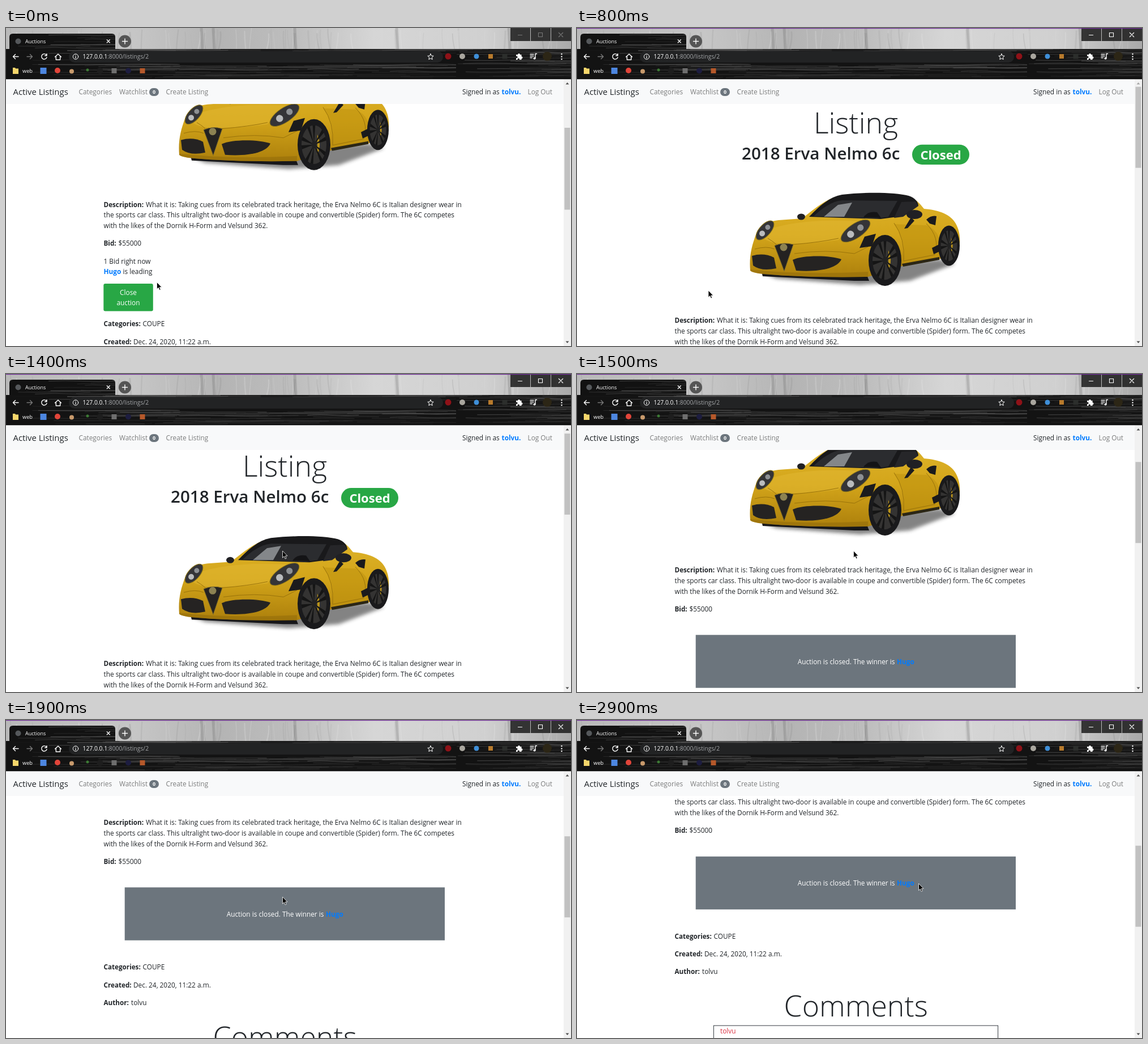
These frames come from a looping animation (998x561 px, 3000 ms). An HTML page:

```html
<!DOCTYPE html>
<html lang="en">
<head>
<meta charset="utf-8">
<title>Auctions</title>
<style>
  html, body { margin: 0; width: 100%; height: 100%; overflow: hidden; background: #fff; }
  svg { display: block; width: 100vw; height: 100vh; }
  text { font: 11.84px "Open Sans", "Noto Sans", sans-serif; fill: #212529; white-space: pre; }
  .b { font-weight: 700; font-size: 11.7px; }
  .link { fill: #007bff; font-weight: 700; }
  .nav { fill: #7c7d7d; }
  .white { fill: #fff; }
  .mid { text-anchor: middle; }
  .display { font-size: 51.8px; font-weight: 300; text-anchor: middle; }
  .line { fill: none; stroke: #fff; stroke-width: 1.4; stroke-linecap: round; stroke-linejoin: round; }
</style>
</head>
<body>
<svg viewBox="0 0 998 561" preserveAspectRatio="none">
  <defs>
    <linearGradient id="paint" x1="0" y1="0" x2="0" y2="1">
      <stop offset="0" stop-color="#dfb42a"/>
      <stop offset=".5" stop-color="#d3a51a"/>
      <stop offset="1" stop-color="#ad800c"/>
    </linearGradient>
    <linearGradient id="fogL" x1="0" y1="0" x2="1" y2="0">
      <stop offset="0" stop-color="#b9b9b9"/>
      <stop offset=".45" stop-color="#c6c6c6"/>
      <stop offset=".75" stop-color="#b4b4b4"/>
      <stop offset="1" stop-color="#bdbdbd"/>
    </linearGradient>
    <linearGradient id="fogR" x1="0" y1="0" x2="1" y2="0">
      <stop offset="0" stop-color="#bcbcbc"/>
      <stop offset=".3" stop-color="#d6d6d6"/>
      <stop offset=".7" stop-color="#d0d0d0"/>
      <stop offset="1" stop-color="#a9a9a9"/>
    </linearGradient>
    <filter id="soft" x="-10%" y="-50%" width="120%" height="200%"><feGaussianBlur stdDeviation="3"/></filter>
    <clipPath id="tabClip"><path d="M6 37V16Q6 10 12 10H187Q193 10 193 16V37Z"/></clipPath>
    <clipPath id="barClip"><rect y="37" width="998" height="53"/></clipPath>
    <clipPath id="bodyClip"><use href="#body"/></clipPath>
  </defs>

  <rect width="998" height="561" fill="#fff"/>

  <g id="page">
    <g id="heading">
      <text class="display" x="492.5" y="186">Listing</text>
      <text x="291" y="232" style="font-size:29.6px;font-weight:600">2018 Erva Nelmo 6c</text>
      <g class="done">
        <rect x="592" y="205.7" width="101" height="35.2" rx="17.6" fill="#28a745"/>
        <text class="mid white" x="642.5" y="232" style="font-size:22px;font-weight:700">Closed</text>
      </g>
    </g>

    <g id="car">
      <path d="M332 434L640 408 668 416 588 446 500 453 352 442Z" fill="#333" opacity=".6" filter="url(#soft)"/>
      <path d="M326 430L512 436 516 446 490 446 328 438Z" fill="#17171a"/>
      <path id="body" d="M306 428C304 404 308 385 317 362 322 348 338 341 356 339L398 336C420 318 440 302 462 296 500 290 560 290 584 296 598 301 606 310 613 319 640 321 660 329 669 345 677 359 678 378 674 390L640 408 574 420 514 439Q410 441 330 434 310 432 306 428Z" fill="url(#paint)"/>
      <g clip-path="url(#bodyClip)">
        <path d="M318 363Q390 331 520 343 480 347 462 374 400 382 366 380 340 382 318 363Z" fill="#e3ba34" opacity=".5"/>
        <path d="M560 346Q584 376 577 421L642 404Q648 360 617 348Z" fill="#c2940f" opacity=".6"/>
        <path d="M306 426Q400 436 514 430V442H306Z" fill="#8f6a0a" opacity=".5"/>
      </g>
      <path d="M410 333C428 314 446 298 468 294 510 289 562 290 586 296 597 300 602 306 603 313L574 332 536 337Z" fill="#19191b"/>
      <path d="M418 332C434 317 450 306 468 304L566 305 550 333 530 336Z" fill="#2b2c2f"/>
      <path d="M436 333L461 312 486 308 472 333Z" fill="#84878a"/>
      <path d="M506 334Q514 322 530 325L537 335Z" fill="#141416"/>
      <path d="M573 307L598 306 603 314 576 333 560 335Z" fill="#262629"/>
      <path d="M617 338Q626 330 635 332L633 348 623 345Z" fill="#1a1a1c"/>
      <path d="M578 354L590 334 596 340 584 353Z" fill="#1c1c1f"/>
      <ellipse cx="596" cy="329" rx="14" ry="8" fill="#202024"/>
      <ellipse cx="396" cy="333" rx="7" ry="5.5" fill="#202024"/>
      <g fill="none" stroke="#9a730a">
        <path d="M337 371Q352 380 353 384M381 382Q430 378 462 371"/>
        <path d="M560 344Q580 372 577 411L632 400Q642 370 617 345"/>
        <path d="M314 390Q335 384 349 390M384 398Q440 390 490 398L514 386"/>
      </g>
      <g id="lamps"></g>
      <path d="M309 402Q330 396 348 405L352 424Q326 430 311 419Z" fill="#252322"/>
      <path d="M381 409C400 400 448 401 467 408 460 424 428 431 387 428Z" fill="#252322"/>
      <path d="M349 384Q365 377 382 382L366 429Z" fill="#242221" stroke="#7d6b2c"/>
      <circle cx="365" cy="387" r="6.5" fill="#8c8252"/>
      <path d="M508 368L528 363 521 385 499 388Z" fill="#1b1b1d"/>
      <path d="M516 399L521 390 519 410Z" fill="#d23420"/>
      <path d="M627 388L641 381 641 394 630 399Z" fill="#1a1a1c"/>
      <path d="M574 416L640 404 640 409 576 421Z" fill="#2b2615"/>
      <g id="wheels"></g>
    </g>

    <g id="copy"></g>

    <g class="open">
      <text x="172.5" y="620">1 Bid right now</text>
      <text class="link" x="172.5" y="638.7">Hugo</text>
      <text x="206.5" y="638.7">is leading</text>
      <rect id="button" x="172.3" y="655.3" width="87.5" height="48.5" rx="3"/>
      <text class="mid white" x="216" y="675">Close</text>
      <text class="mid white" x="216" y="693.7">auction</text>
    </g>

    <g class="done">
      <rect x="209.7" y="630.3" width="565.3" height="93.4" fill="#6c757d"/>
      <text class="white" x="389.7" y="681.7">Auction is closed. The winner is</text>
      <text class="link" x="565" y="681.7">Hugo</text>
    </g>

    <g id="meta"></g>

    <g class="done">
      <text class="display" x="492.7" y="912.5">Comments</text>
      <rect x="241.4" y="928.6" width="502.2" height="80" fill="none" stroke="#343a40"/>
      <text x="253" y="942.6" style="fill:#dc3545">tolvu</text>
    </g>
  </g>

  <g id="navbar">
    <rect y="90" width="985" height="44" fill="#f8f9fa"/>
    <text x="12.5" y="118.3" style="font-size:14.9px">Active Listings</text>
    <text class="nav" x="128.5" y="117">Categories</text>
    <text class="nav" x="200" y="117">Watchlist</text>
    <rect x="253" y="106" width="17" height="14" rx="7" fill="#6c757d"/>
    <text class="mid white" x="261.5" y="116.4" style="font-size:9px;font-weight:700">0</text>
    <text class="nav" x="282.5" y="117">Create Listing</text>
    <text x="806" y="117">Signed in as</text>
    <text class="link" x="875.5" y="117">tolvu.</text>
    <text class="nav" x="921.5" y="117">Log Out</text>
  </g>

  <g id="scrollbar">
    <rect x="985" y="90" width="13" height="471" fill="#f1f1f1"/>
    <rect id="thumb" x="986.5" width="10" fill="#c1c1c1"/>
    <path id="up" d="M988.5 99.5L991.5 96 994.5 99.5Z"/>
    <path d="M988.5 552.5L991.5 556 994.5 552.5Z" fill="#505050"/>
  </g>

  <g id="browser">
    <rect width="502" height="37" fill="url(#fogL)"/>
    <rect x="502" width="496" height="37" fill="url(#fogR)"/>
    <g id="trees"></g>
    <rect y="37" width="998" height="53" fill="#131313"/>
    <path d="M6 37V16Q6 10 12 10H187Q193 10 193 16V37Z" fill="#121212"/>
    <g id="tabGrain" clip-path="url(#tabClip)"></g>
    <g id="barGrain" clip-path="url(#barClip)"></g>
    <rect y="89" width="998" height="1.3" fill="#050505"/>

    <circle cx="21.5" cy="23.5" r="5" fill="#55585b"/>
    <text class="white" x="34" y="26.8" style="font-size:9px">Auctions</text>
    <path class="line" d="M178.3 20.7l5 5m0-5l-5 5"/>
    <circle cx="210" cy="23.5" r="11" fill="#555"/>
    <path class="line" d="M205.5 23.5h9m-4.5-4.5v9"/>

    <path class="line" d="M22 50.5H12.5m4-4l-4 4 4 4"/>
    <path class="line" d="M37 50.5h9.5m-4-4l4 4-4 4" style="stroke:#777"/>
    <path class="line" d="M71 47.2a4.7 4.7 0 1 0 1 4.5M72 45.5v3.3h-3.3"/>
    <path class="line" d="M86.5 51l5.5-5 5.5 5M88.3 50v6h7.4v-6"/>
    <rect x="111" y="40.5" width="661" height="20.5" rx="10.2" fill="#222324"/>
    <circle class="line" cx="123" cy="50.5" r="4.7" style="stroke-width:1"/>
    <path class="line" d="M123 50v3m0-5.2v.1" style="stroke-width:1.2"/>
    <text class="white" x="135.5" y="54.3" style="font-size:10.3px">127.0.0.1<tspan fill="#a4a6a8">:8000/listings/2</tspan></text>
    <path class="line" d="M750 45.5l1.5 3.4 3.7.4-2.8 2.5.8 3.7-3.2-1.9-3.2 1.9.8-3.7-2.8-2.5 3.7-.4Z" style="stroke-width:1"/>
    <g id="icons"></g>
    <path d="M901 47h3a2 2 0 1 1 4 0h2.5v3.2a2 2 0 1 1 0 4V56h-3.5a1.8 1.8 0 1 0-3.4 0H901v-3a1.8 1.8 0 1 0 0-3.2Z" fill="#fff"/>
    <path class="line" d="M926 46.5h6m-6 3h6m-6 3h3.5m5.5 1v-8h2.5"/>
    <circle cx="933.5" cy="53.5" r="2" fill="#fff"/>
    <path d="M981.5 46v.1m0 4.4v.1m0 4.4v.1" stroke="#fff" stroke-width="2.4" stroke-linecap="round"/>
    <path d="M12 70h4l1 1.5h5V81H12Z" fill="#f6d66b"/>
    <text class="white" x="29" y="78.7" style="font-size:9.2px">web</text>

    <path d="M891 0h35v23h-35ZM927 0h35v23h-35ZM963 0h35v23h-35Z" fill="#202020" opacity=".88"/>
    <path id="controls" d="M904 12.5h8M940.5 8.5h7v7h-7ZM976 8l8 8m0-8l-8 8" fill="none" stroke-width="1.1"/>
    <rect id="focusLine" width="998" height="1.2" fill="#6d2c94"/>
  </g>

  <path id="arrow" d="M0 0V12.2L2.8 9.6 4.7 14 6.7 13.1 4.8 8.9H8.6Z" fill="#000" stroke="#fff" stroke-width=".8"/>
  <path id="hand" d="M0 1.2Q1.2-.6 2.4 1.2V6L4.3 6.2 6.4 6.7 8.2 7.4Q9.2 8 9 9.5L8.3 13.2 7.3 15.5H1.2L-.8 12.2-3 9Q-2.6 7.5-1.2 8.2L0 9.4Z" fill="#fff" stroke="#000" stroke-width=".9"/>
</svg>

<script>
const LOOP = 3000, STEP = 100;
const $ = id => document.getElementById(id);
const all = name => [...document.getElementsByClassName(name)];
const times = (n, fn) => Array.from({ length: n }, (_, i) => fn(i)).join('');

let seed = 11;
const rnd = (a = 0, b = 1) => {
  seed = (seed * 16807) % 2147483647;
  return +(a + (b - a) * seed / 2147483647).toFixed(2);
};

const row = (y, label, value, x) =>
  `<text class="b" x="172.5" y="${y}">${label}</text><text x="${x}" y="${y}">${value}</text>`;

$('copy').innerHTML =
  row(520, 'Description:', 'What it is: Taking cues from its celebrated track heritage, the Erva Nelmo 6C is Italian designer wear in', 247) +
  '<text x="172.5" y="538.7">the sports car class. This ultralight two-door is available in coupe and convertible (Spider) form. The 6C competes</text>' +
  '<text x="172.5" y="557.5">with the likes of the Dornik H-Form and Velsund 362.</text>' +
  row(588.8, 'Bid:', '$55000', 198.5);

$('meta').innerHTML =
  row(775.3, 'Categories:', 'COUPE', 241.5) +
  row(806.5, 'Created:', 'Dec. 24, 2020, 11:22 a.m.', 225) +
  row(837.8, 'Author:', 'tolvu', 221);

// Car details
const lamp = (x, y, rx, ry, turn) => `<g transform="translate(${x} ${y}) rotate(${turn})">
  <ellipse rx="${rx}" ry="${ry}" fill="#343437" stroke="#8f7718"/>
  <circle cx="${rx * -.35}" r="${ry * .5}" fill="#b9bbbd"/>
  <circle cx="${rx * .35}" r="${ry * .45}" fill="#8d9093"/></g>`;
$('lamps').innerHTML = lamp(332, 357, 21, 10, -48) + lamp(492, 358, 30, 12.5, -34);

const wheel = (x, y, rx, ry) => `<g transform="translate(${x} ${y}) scale(${rx / 10} ${ry / 10})">
  <circle r="10" fill="#1a1a1c"/><circle r="7.6" fill="#343332"/>
  <path d="M2 -4Q5 0 2 4Z" fill="#b8921a"/>
  ${times(10, i => `<path d="M0 0L-.8 -7.6H.8Z" fill="#151515" transform="rotate(${i * 36 + (i % 2) * 10})"/>`)}
  <circle r="1.5" fill="#222"/></g>`;
$('wheels').innerHTML = wheel(657, 384, 19, 35.5) + wheel(544, 410, 29, 45);

// Misty trees and dark wood grain of the browser theme
$('trees').innerHTML = times(70, () => {
  const x = rnd(0, 998), y = rnd(0, 10);
  return `<path d="M${x} ${y}q${rnd(-2, 2)} 12 ${rnd(-4, 4)} ${37 - y}" fill="none" stroke="${rnd() < .6 ? '#eee' : '#888'}" stroke-width="${rnd(.5, 3)}" opacity="${rnd(.08, .25)}"/>`;
}) + [345, 366, 510, 690, 888].map(x => `<path d="M${x} 0l2 37" stroke="#666" stroke-width="5" opacity=".25"/>`).join('');

const grain = (n, x0, x1, y0, y1) => times(n, () => {
  const x = rnd(x0, x1 - 30), len = Math.min(rnd(50, 280), x1 - x), v = Math.round(rnd(45, 120));
  return `<path d="M${x} ${rnd(y0, y1)}q${len / 4} ${rnd(-2, 2)} ${len / 2} 0t${len / 2} 0" fill="none" stroke="rgb(${v},${v},${v})" stroke-width="${rnd(.3, 1.3)}" opacity="${rnd(.3, .7)}"/>`;
});
$('tabGrain').innerHTML = grain(12, 6, 193, 11, 37);
$('barGrain').innerHTML = grain(20, 0, 998, 37, 41) + grain(30, 0, 795, 37, 66) +
  grain(70, 0, 795, 64, 89) + grain(45, 795, 998, 37, 89);

// Extension and bookmark marks: x, y, radius, colour, square?
$('icons').innerHTML = [
  [781, 50, 5.5, '#8f1218'], [806, 50, 5, '#a9a69e'], [831, 50, 4.5, '#3f8fd8'],
  [856, 50, 4, '#b87a2c', 1], [881, 50, 4.5, '#2c2e2c', 1], [956, 50, 8, '#2c2616'],
  [66, 75.5, 5.5, '#4d86e0', 1], [91, 75, 5, '#e2453a'], [116, 76.5, 4, '#c89a6c'],
  [144, 74, 2.5, '#3c7a35'], [166, 75.5, 5.5, '#1e1e1e'], [191, 75.5, 4.5, '#6e6e6e', 1],
  [216, 75.5, 5, '#1d1d40'], [241, 75.5, 4.5, '#b5582a', 1]
].map(([x, y, r, fill, square]) =>
  `<rect x="${x - r}" y="${y - r}" width="${2 * r}" height="${2 * r}" rx="${square ? 0 : r}" fill="${fill}"/>`).join('');

// Tracks: [time, value, ...]
const pointer = [
  [0, 266.5, 448.5], [100, 259, 439], [200, 249, 436], [300, 238, 452], [400, 232, 463],
  [800, 232, 463], [900, 250, 451], [1000, 296.5, 419.5], [1100, 412, 352], [1200, 488.5, 312],
  [2100, 488.5, 312], [2400, 540, 307], [2500, 564, 294], [2600, 583, 284], [2700, 595, 281],
  [2800, 601, 284], [2900, 603.5, 288.5]
];
const scroll = [
  [1200, 0], [1300, .8], [1400, 4.7], [1500, 170], [1600, 310], [1700, 311.5],
  [1800, 311.5], [1900, 335], [2000, 380], [2100, 389.5]
];

function at(track, t) {
  const i = track.findIndex(k => k[0] > t);
  if (i === 0) return track[0].slice(1);
  if (i < 0) return track[track.length - 1].slice(1);
  const a = track[i - 1], b = track[i], u = (t - a[0]) / (b[0] - a[0]);
  return a.slice(1).map((v, j) => v + (b[j + 1] - v) * u);
}

const show = (el, on) => el.setAttribute('display', on ? 'inline' : 'none');

function draw(ms) {
  const t = Math.floor((ms % LOOP) / STEP) * STEP;
  const closed = t >= 800, focused = t >= 700, hover = t >= 300 && !closed;
  const y = closed ? at(scroll, t)[0] : 204.3;
  const [px, py] = at(pointer, t);

  $('page').setAttribute('transform', `translate(0 ${-y})`);
  $('meta').setAttribute('transform', `translate(0 ${closed ? 0 : -44.7})`);
  all('open').forEach(el => show(el, !closed));
  all('done').forEach(el => show(el, closed));
  $('button').setAttribute('fill', hover ? '#218838' : '#28a745');

  $('thumb').setAttribute('y', closed ? 103.7 + y * .303 : 176);
  $('thumb').setAttribute('height', closed ? 143 : 144.5);
  $('up').setAttribute('fill', y ? '#505050' : '#a3a3a3');

  $('controls').setAttribute('stroke', focused ? '#fff' : '#777');
  show($('focusLine'), focused);

  show($('hand'), hover);
  show($('arrow'), !hover);
  $(hover ? 'hand' : 'arrow').setAttribute('transform', `translate(${px} ${py})`);
}

const start = performance.now();
function tick() {
  draw(performance.now() - start);
  requestAnimationFrame(tick);
}
tick();
</script>
</body>
</html>
```
